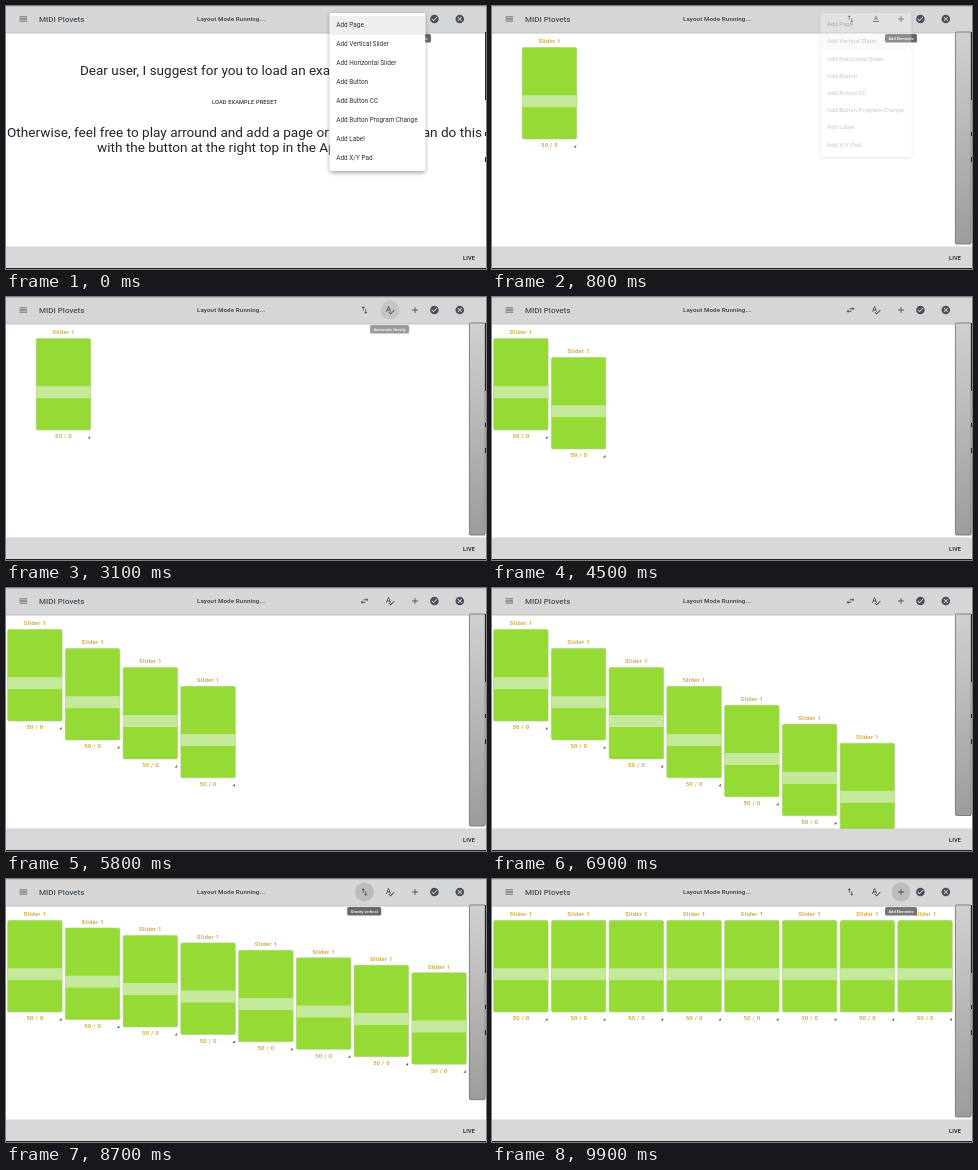
An HTML page that plays this animation: 480x263 px, repeating every 10 s.

```html
<!DOCTYPE html>
<html lang="en">
<head>
<meta charset="utf-8">
<title>MIDI layout editor</title>
<style>
  html, body { margin: 0; width: 100%; height: 100%; overflow: hidden; background: #fff; }
  svg { display: block; width: 100vw; height: 100vh; font-family: Roboto, "Open Sans", sans-serif; }
</style>
</head>
<body>
<svg id="stage" viewBox="0 0 480 263">
  <defs>
    <linearGradient id="thumb" x1="0" y1="0" x2="0" y2="1">
      <stop offset="0" stop-color="#d0d0d0"/>
      <stop offset="1" stop-color="#9c9c9c"/>
    </linearGradient>
    <linearGradient id="shade" x1="0" y1="0" x2="0" y2="1">
      <stop offset="0" stop-color="#000" stop-opacity=".28"/>
      <stop offset="1" stop-color="#000" stop-opacity="0"/>
    </linearGradient>
    <filter id="lift" x="-20%" y="-20%" width="140%" height="140%">
      <feDropShadow dx="0" dy="1.5" stdDeviation="2" flood-opacity=".4"/>
    </filter>
  </defs>
</svg>
<script>
const LOOP = 10000, STEP = 100;
const INK = '#46515b', GOLD = '#d3ad52';
const stage = document.getElementById('stage');

function add(parent, tag, attrs = {}, text) {
  const node = document.createElementNS('http://www.w3.org/2000/svg', tag);
  for (const key in attrs) node.setAttribute(key, attrs[key]);
  if (text) node.textContent = text;
  parent.appendChild(node);
  return node;
}
const group = (parent = stage) => add(parent, 'g');
const rect = (parent, x, y, width, height, fill, more) =>
  add(parent, 'rect', { x, y, width, height, fill, ...more });
// Text is centred vertically on its y.
const label = (parent, x, y, size, text, more) =>
  add(parent, 'text', { x, y: y + size * 0.355, 'font-size': size, fill: '#333', ...more }, text);
const centred = { 'text-anchor': 'middle' };

const clamp = v => Math.max(0, Math.min(1, v));
const ramp = (t, from, to) => clamp((t - from) / (to - from));
const ease = p => p * p * (3 - 2 * p);
const mix = (a, b, p) => a + (b - a) * p;
const show = (node, on) => node.setAttribute('opacity', Number(on));

// Welcome page
const welcome = group();
const big = 13.6, bigInk = { fill: '#242424' };
label(welcome, 74, 64, 13.5, 'Dear user, I suggest for you to load an example preset', bigInk);
label(welcome, 238.5, 96, 5.6, 'LOAD EXAMPLE PRESET',
  { ...centred, 'font-weight': 500, 'letter-spacing': .16 });
label(welcome, 1, 126, big, 'Otherwise, feel free to play arround and add a page or', bigInk);
label(welcome, 476, 126, big, 'You can do this', { ...bigInk, 'text-anchor': 'end' });
label(welcome, 91, 141.5, big, 'with the button at the right top in the Appbar', bigInk);

// Sliders
const bornAt = [800, 4500, 5200, 5700, 5900, 6200, 6800, 7800];
const caption = { ...centred, fill: GOLD, 'font-weight': 700, 'letter-spacing': .2 };
const sliders = bornAt.map(() => {
  const g = group();
  label(g, 27.3, -6.3, 6.1, 'Slider 1', caption);
  rect(g, 0, 0, 54.5, 91.5, '#95da35', { rx: 1.5, stroke: '#a9cf7c', 'stroke-width': .6 });
  rect(g, 0, 47.7, 54.5, 12, '#c5e99a');
  label(g, 27.3, 97.8, 6.1, '50 / 0', caption);
  add(g, 'path', { d: 'M54 97.5v2.5h-2.5z', fill: '#555' });
  return g;
});

// Window frame
rect(stage, 0, 26, 480, 2.5, 'url(#shade)');
rect(stage, 0, 0, 480, 26.2, '#d6d6d6');
rect(stage, 0, 0, 480, .6, '#aaa');
rect(stage, 0, 241, 480, 22, '#d8d8d8');
rect(stage, 0, 240.6, 480, .5, '#c8c8c8');
rect(stage, 0, 262, 480, 1, '#222');
const scrollbar = rect(stage, 463.4, 26, 15.8, 212, 'url(#thumb)',
  { rx: 1.2, stroke: '#777', 'stroke-width': .9 });
for (const [y, h] of [[26, 68], [126, 4], [151, 5]]) rect(stage, 479, y, 1, h, '#222');
label(stage, 33, 13, 8, 'MIDI Plovets', { fill: INK, 'font-weight': 500 });
label(stage, 191, 13, 6.2, 'Layout Mode Running...',
  { fill: INK, 'font-weight': 700, 'letter-spacing': .1 });
label(stage, 457, 252, 5.6, 'LIVE', { 'font-weight': 700, 'letter-spacing': .15 });

// Toolbar
const halo = x => add(stage, 'circle', { cx: x, cy: 13, r: 9.5, fill: '#000', 'fill-opacity': .12 });
const icon = (x, d, scale = .42) => add(stage, 'path', {
  d, fill: INK, transform: `translate(${x} 13) scale(${scale}) translate(-12 -12)`
});
const tooltip = (x, width, text) => {
  const g = group();
  rect(g, x - width / 2, 28, width, 8.6, '#616161', { rx: 1.6, 'fill-opacity': .95 });
  label(g, x, 32.2, 4.05, text, { ...centred, fill: '#fff', 'font-weight': 500 });
  return g;
};
const halos = { way: halo(358.5), gravity: halo(384), plus: halo(409) };

icon(17.3, 'M3 18h18v-2H3v2zm0-5h18v-2H3v2zm0-7v2h18V6H3z');
const vertical = icon(358.5, 'M16 17V10h-2v7h-3l4 4 4-4h-3zM9 3L5 7h3v7h2V7h3L9 3z');
const horizontal = icon(358.5, 'M7 11l-4 4 4 4v-3h7v-2H7v-3zM21 9l-4-4v3h-7v2h7v3l4-4z');
const plainA = icon(384, 'M5 17v2h14v-2H5zm4.5-4.2h5l.9 2.2h2.1L12.75 4h-1.5L6.5 15h2.1l.9-2.2zM12 6l1.87 5h-3.74L12 6z');
const checkedA = icon(384, 'M12.45 16h2.1L9.43 3H7.57L2.46 16h2.1l1.1-3h5.65l1.14 3zm-6-5L8.5 5.5l2.07 5.5H6.43zm15.14.6l-8.1 8.1L9.83 16l-1.4 1.4 5.08 5.1L23 13l-1.4-1.4z');
icon(409, 'M19 13h-6v6h-2v-6H5v-2h6V5h2v6h6v2z');
const disc = 'M12 2a10 10 0 1 0 0 20a10 10 0 1 0 0-20z';
icon(428.4, disc + 'm-2 15l-5-5 1.4-1.4 3.6 3.6 7.6-7.6L19 8l-9 9z', .43).setAttribute('fill-rule', 'evenodd');
icon(453.8, disc + 'm5 13.6L15.6 17 12 13.4 8.4 17 7 15.6l3.6-3.6L7 8.4 8.4 7l3.6 3.6L15.6 7 17 8.4 13.4 12z', .43).setAttribute('fill-rule', 'evenodd');

const tips = {
  way: tooltip(358.2, 34, 'Gravity vertical'),
  gravity: tooltip(383.6, 39, 'Automatic Gravity'),
  plus: tooltip(409, 32, 'Add Elements')
};

// Menu
const menu = group();
const MENU_ROW = 18.95;
rect(menu, 323.7, 7, 95.5, 158, '#fff', { rx: 1.7, filter: 'url(#lift)' });
const highlight = rect(menu, 323.7, 10, 95.5, MENU_ROW, '#efefef');
const ripple = add(menu, 'ellipse', { cx: 386, cy: 38, rx: 14, ry: 9, fill: '#ddd' });
['Page', 'Vertical Slider', 'Horizontal Slider', 'Button', 'Button CC',
  'Button Program Change', 'Label', 'X/Y Pad'].forEach((name, i) =>
  label(menu, 330.3, 19.2 + i * MENU_ROW, 6.42, 'Add ' + name));

function scrollEnd(t) {
  const shorter = mix(238, 227.5, ramp(t, 6700, 6900));
  return mix(t < 7800 ? shorter : 212, 238, ramp(t, 8600, 8900));
}

function draw(t) {
  show(welcome, t < 800);

  const left = ease(ramp(t, 3450, 3750));
  const up = ease(ramp(t, 8500, 8850));
  sliders.forEach((g, i) => {
    const x = mix(30.2, 1.6, left) + i * 57.75;
    const y = 41.5 + i * 18.95 * (1 - up);
    g.setAttribute('transform', `translate(${x} ${y})`);
    show(g, t >= bornAt[i]);
  });

  show(scrollbar, t >= 800);
  scrollbar.setAttribute('height', scrollEnd(t) - 26);

  const sideways = t >= 3500 && t < 8500;
  show(horizontal, sideways);
  show(vertical, !sideways);
  show(plainA, t < 2500);
  show(checkedA, t >= 2500);

  const hover = {
    way: ramp(t, 3100, 3300) * (1 - ramp(t, 3500, 3800)) +
         ramp(t, 8100, 8400) * (1 - ramp(t, 9300, 9600)),
    gravity: ramp(t, 1900, 2300) * (1 - ramp(t, 3000, 3300)),
    plus: ramp(t, 9500, 9900)
  };
  for (const key in hover) {
    show(halos[key], hover[key]);
    show(tips[key], hover[key]);
  }
  show(tips.plus, t < 5000 ? 1 - ramp(t, 1800, 2100) : hover.plus * .9);

  const closing = t < 800 ? 0 : t < 900 ? .21 : .6;
  menu.setAttribute('transform',
    `translate(419.2 7) scale(${1 - closing * .25} ${1 - closing * .4375}) translate(-419.2 -7)`);
  show(menu, t < 800 ? 1 : t < 900 ? .27 : t < 1000 ? .06 : 0);
  highlight.setAttribute('y', t < 300 ? 10 : 10 + MENU_ROW - .5);
  show(ripple, t >= 600 && t < 800);
}

const start = performance.now();
function tick() {
  const t = (performance.now() - start) % LOOP;
  draw(Math.floor(t / STEP) * STEP);
  requestAnimationFrame(tick);
}
tick();
</script>
</body>
</html>
```
